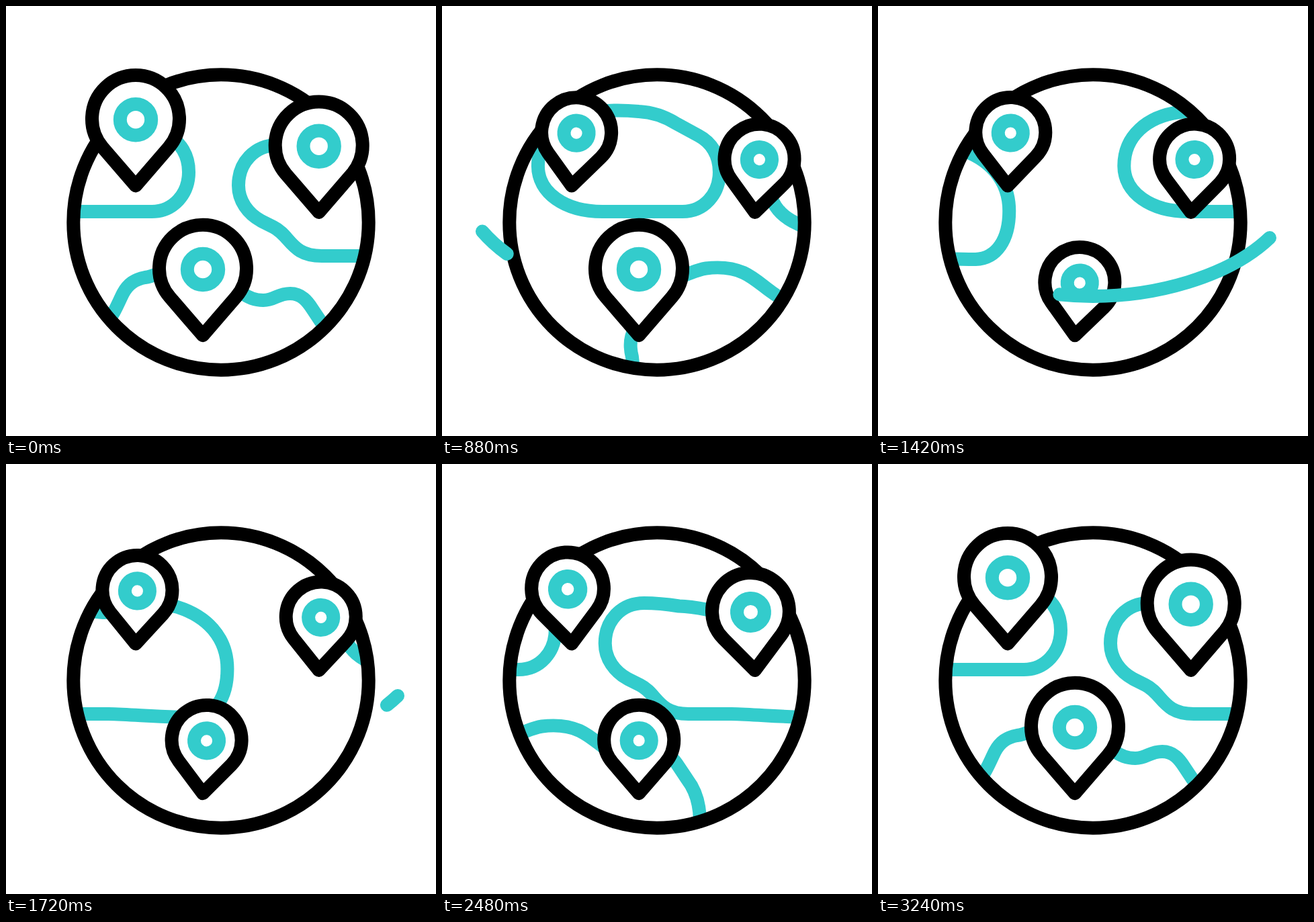
Recreate the animation shown at these times as an HTML page. Size 640 px wide and 640 px high, loop 3340 ms.

```html
<!DOCTYPE html>
<html lang="en">
<head>
<meta charset="utf-8">
<title>Spinning globe with pins</title>
<style>
  html, body { margin: 0; width: 100%; height: 100%; overflow: hidden; background: #fff; }
  svg { display: block; width: 100%; height: 100%; }
  path, circle, line { stroke-width: 20; stroke-linecap: round; stroke-linejoin: round; }
  .line { fill: none; stroke: #3cc; }
  .ink { stroke: #000; }
</style>
</head>
<body>
<svg id="stage" viewBox="0 0 640 640">
  <defs>
    <clipPath id="disc"><circle cx="320" cy="322" r="219"/></clipPath>
    <g id="land" class="line">
      <path d="M98 306H217C249 306 272 280 272 247C272 222 260 203 241 193L207 174.500C190 164 172 158 152 157C130 155 105 155 85 158C36 164 2 194 2 238C2 278 42 306 98 306Z"/>
      <path d="M404 207C370 207 346 233 346 267C346 290 360 309 380 320L398 329C424 342 424 372 470 372H534C575 373 610 377 661 377C692 376 711 348 711 305C711 256 678 226 637 213C630 211 620 209 611 210C580 211 545 221 526 221C505 220 485 212 456 211.500C440 209 420 207 404 207Z"/>
      <path d="M146 560L142 522C136 498 142 484 155 465C162 455 168 440 174 428C182 413 192 407 207 404C222 402 235 393 252 390.500C272 388 290 389 308 397C325 405 338 418 350 426C360 434 370 438 383 438C400 438 404 428 423 428C440 428 449 440 456 451L468 469C481 486 487 505 487 530V560"/>
    </g>
  </defs>
  <g clip-path="url(#disc)">
    <use id="near" href="#land"/>
    <use id="far" href="#land"/>
  </g>
  <circle class="ink" cx="320" cy="322" r="219.700" fill="none"/>
  <g id="sparks"></g>
  <g id="pins"></g>
  <path id="orbit" class="line" pathLength="1" d="M60 335.500C120 405 230 432 320 432C410 432 520 405 583 345"/>
</svg>
<script>
const LOOP = 3340, TURN = 880;
const $ = id => document.getElementById(id);

function add(parent, tag, attrs) {
  const el = document.createElementNS('http://www.w3.org/2000/svg', tag);
  for (const k in attrs) el.setAttribute(k, attrs[k]);
  return parent.appendChild(el);
}

const ease = (t, a, b) => {
  const u = Math.min(1, Math.max(0, (t - a) / (b - a)));
  return u * u * (3 - 2 * u);
};

// Eased value from [time, value] steps
function track(steps, t) {
  let v = steps[0][1];
  for (let i = 1; i < steps.length; i++)
    v += (steps[i][1] - steps[i - 1][1]) * ease(t, steps[i - 1][0], steps[i][0]);
  return v;
}

// Smooth curve through [time, value] steps, at rest at both ends
function curve(steps, t) {
  const n = steps.length - 1;
  if (t <= steps[0][0]) return steps[0][1];
  if (t >= steps[n][0]) return steps[n][1];
  const slope = i => i < 1 || i >= n ? 0
    : (steps[i + 1][1] - steps[i - 1][1]) / (steps[i + 1][0] - steps[i - 1][0]);
  let i = 0;
  while (t > steps[i + 1][0]) i++;
  const [t0, a] = steps[i], [t1, b] = steps[i + 1];
  const h = t1 - t0, u = (t - t0) / h, w = u * u * (3 - 2 * u);
  return a + (b - a) * w
    + h * slope(i) * u * (1 - u) ** 2
    - h * slope(i + 1) * u * u * (1 - u);
}

// Show only the part of a path between two fractions
function trim(el, from, to) {
  const on = to - from > 0.002;
  el.style.display = on ? '' : 'none';
  if (!on) return;
  el.setAttribute('stroke-dasharray', `${to - from} 3`);
  el.setAttribute('stroke-dashoffset', -from);
}

const spin = [[220, 0], [620, 57], [1140, 242], [1720, 498], [2160, 674], [2760, 846], [3220, TURN]];

// sparks: inner x, y, outer x, y
const pins = [
  { x: 193, y: 267.5, shrink: 220, grow: 2400,
    sparks: [[154, 80, 152, 43.5], [107, 88, 92, 73], [97, 134, 57, 126]] },
  { x: 465.7, y: 307, shrink: 535, grow: 2330,
    sparks: [[500, 121, 505.5, 101.5], [545, 151, 557, 139], [562, 200, 584.5, 200]] },
  { x: 293, y: 490.3, shrink: 885, grow: 2618,
    sparks: [[231, 552, 226, 567], [290, 564, 290, 568], [353, 560, 356, 567]] }
];

for (const p of pins) {
  const { shrink: s, grow: g } = p;
  p.size = [[s, 1], [s + 340, 0.8], [g, 0.8], [g + 340, 1]];
  p.tilt = [[s, 0], [s + 110, -8], [s + 380, 5.5], [g, 0], [g + 110, -5], [g + 340, 5.5], [g + 600, 0]];
  p.el = add($('pins'), 'g', {});
  add(p.el, 'path', { class: 'ink', fill: '#fff', d: 'M0 0L-49.2-57A65 65 0 1 1 49.2-57Z' });
  add(p.el, 'circle', { class: 'line', cy: -98.3, r: 23.2 });
  p.rays = p.sparks.map(([x1, y1, x2, y2]) =>
    add($('sparks'), 'path', { class: 'line', pathLength: 1, d: `M${x1} ${y1}L${x2} ${y2}` }));
}

function draw(t) {
  const x = curve(spin, t);
  $('near').setAttribute('x', x);
  $('far').setAttribute('x', x - TURN);
  trim($('orbit'), ease(t, 1120, 1800), ease(t, 760, 1424));
  for (const p of pins) {
    const k = track(p.size, t);
    p.el.setAttribute('transform', `translate(${p.x} ${p.y}) rotate(${track(p.tilt, t)}) scale(${k})`);
    for (const part of p.el.children) part.style.strokeWidth = 20 / k;
    const tail = ease(t, p.grow + 250, p.grow + 530), head = ease(t, p.grow + 180, p.grow + 380);
    for (const ray of p.rays) trim(ray, tail, head);
  }
}

const start = performance.now();
function tick() {
  draw((performance.now() - start) % LOOP);
  requestAnimationFrame(tick);
}
tick();
</script>
</body>
</html>
```
